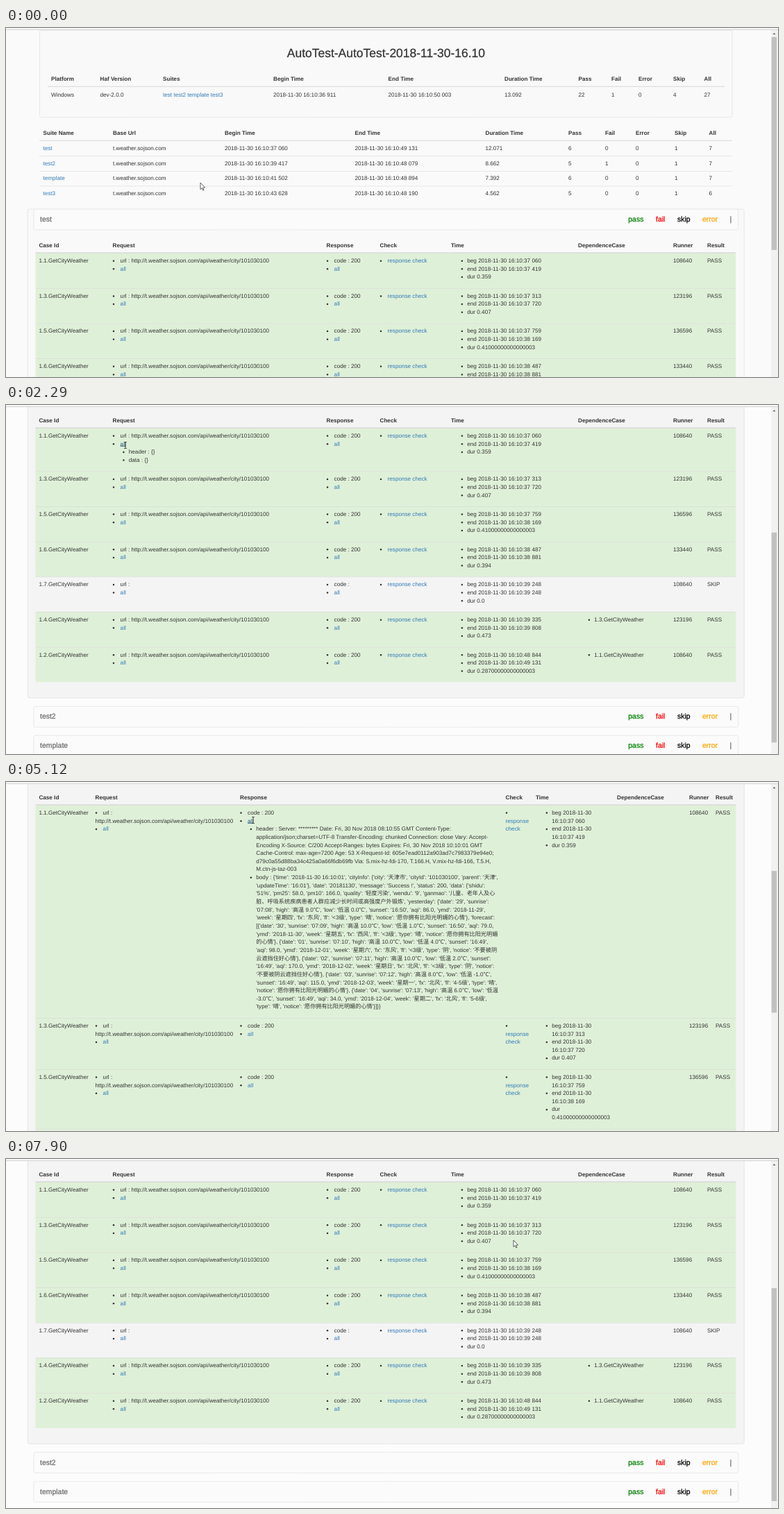
Animation of 1112x503 px, one loop 8 s. Source, as an HTML page with a canvas:

```html
<!DOCTYPE html>
<html lang="en">
<head>
<meta charset="utf-8">
<title>Test report</title>
<style>
html, body { margin: 0; width: 100%; height: 100%; overflow: hidden; background: #fafafa; }
canvas { display: block; }
</style>
</head>
<body>
<canvas id="stage" width="1112" height="503"></canvas>
<script>
const ctx = document.getElementById('stage').getContext('2d');
const LOOP = 8000, SCALE = 0.5825, LINE = 20 * SCALE, SCROLL = 291.1, VIEW = 516;
const INK = '#333', LINK = '#337ab7', HOVER = '#23527c', RULE = '#ddd';
const FAMILY = '"Liberation Sans", Arial, "Noto Sans CJK SC", "Noto Sans CJK", sans-serif';
const font = (px, weight = '') => `${weight} ${px * SCALE}px ${FAMILY}`;
const BODY = font(14), BOLD = font(14, 'bold'), NAV = font(18), TITLE = font(30);
const DAY = '2018-11-30', URL_TEXT = 'http://t.weather.sojson.com/api/weather/city/101030100';

const COLUMNS = {
  plain: [47.4, 153.5, 461.5, 538.5, 641, 824, 961, 1010],
  response: [47.4, 128.5, 337, 719.5, 763, 880, 984, 1022],
  check: [47.4, 151, 453, 528, 650, 829, 963, 1011.5]
};
const CASE_HEADS = ['Case Id', 'Request', 'Response', 'Check', 'Time', 'DependenceCase', 'Runner', 'Result'];
// id, begin, end, duration, runner, dependence
const CASES = [
  ['1.1', '10:37 060', '10:37 419', '0.359', '108640'],
  ['1.3', '10:37 313', '10:37 720', '0.407', '123196'],
  ['1.5', '10:37 759', '10:38 169', '0.41000000000000003', '136596'],
  ['1.6', '10:38 487', '10:38 881', '0.394', '133440'],
  ['1.7', '10:39 248', '10:39 248', '0.0', '108640'],
  ['1.4', '10:39 335', '10:39 808', '0.473', '123196', '1.3'],
  ['1.2', '10:48 844', '10:49 131', '0.28700000000000003', '108640', '1.1']
];
const RUN_X = [65, 135.5, 226, 385, 550.5, 718, 824.5, 872, 911, 961, 1005.5];
const SUITE_X = [53.5, 154, 315, 502.5, 690.5, 810, 863, 907, 963, 1012.5];
const COUNTS = ['Begin Time', 'End Time', 'Duration Time', 'Pass', 'Fail', 'Error', 'Skip', 'All'];
const SUITES = [
  ['test', '37 060', '49 131', '12.071', 6, 0, 7],
  ['test2', '39 417', '48 079', '8.662', 5, 1, 7],
  ['template', '41 502', '48 894', '7.392', 6, 0, 7],
  ['test3', '43 628', '48 190', '4.562', 5, 0, 6]
];

const HEADER = `header : Server: ********* Date: Fri, 30 Nov 2018 08:10:55 GMT Content-Type:
application/json;charset=UTF-8 Transfer-Encoding: chunked Connection: close Vary: Accept-
Encoding X-Source: C/200 Accept-Ranges: bytes Expires: Fri, 30 Nov 2018 10:10:01 GMT
Cache-Control: max-age=7200 Age: 53 X-Request-Id: 605e7ead0112a903ad7c7983379e94e0;
d79c0a55d88ba34c425a0a66f6db69fb Via: S.mix-hz-fdi-170, T.166.H, V.mix-hz-fdi-166, T.5.H,
M.ctn-js-taz-003`.split('\n');
const PAYLOAD = `body : {'time': '2018-11-30 16:10:01', 'cityInfo': {'city': '天津市', 'cityId': '101030100', 'parent': '天津',
'updateTime': '16:01'}, 'date': '20181130', 'message': 'Success !', 'status': 200, 'data': {'shidu':
'51%', 'pm25': 58.0, 'pm10': 166.0, 'quality': '轻度污染', 'wendu': '9', 'ganmao': '儿童、老年人及心
脏、呼吸系统疾病患者人群应减少长时间或高强度户外锻炼', 'yesterday': {'date': '29', 'sunrise':
'07:08', 'high': '高温 9.0℃', 'low': '低温 0.0℃', 'sunset': '16:50', 'aqi': 86.0, 'ymd': '2018-11-29',
'week': '星期四', 'fx': '东风', 'fl': '<3级', 'type': '晴', 'notice': '愿你拥有比阳光明媚的心情'}, 'forecast':
[{'date': '30', 'sunrise': '07:09', 'high': '高温 10.0℃', 'low': '低温 1.0℃', 'sunset': '16:50', 'aqi': 79.0,
'ymd': '2018-11-30', 'week': '星期五', 'fx': '西风', 'fl': '<3级', 'type': '晴', 'notice': '愿你拥有比阳光明媚
的心情'}, {'date': '01', 'sunrise': '07:10', 'high': '高温 10.0℃', 'low': '低温 4.0℃', 'sunset': '16:49',
'aqi': 98.0, 'ymd': '2018-12-01', 'week': '星期六', 'fx': '东风', 'fl': '<3级', 'type': '阴', 'notice': '不要被阴
云遮挡住好心情'}, {'date': '02', 'sunrise': '07:11', 'high': '高温 10.0℃', 'low': '低温 2.0℃', 'sunset':
'16:49', 'aqi': 170.0, 'ymd': '2018-12-02', 'week': '星期日', 'fx': '北风', 'fl': '<3级', 'type': '阴', 'notice':
'不要被阴云遮挡住好心情'}, {'date': '03', 'sunrise': '07:12', 'high': '高温 8.0℃', 'low': '低温 -1.0℃',
'sunset': '16:49', 'aqi': 115.0, 'ymd': '2018-12-03', 'week': '星期一', 'fx': '北风', 'fl': '4-5级', 'type': '晴',
'notice': '愿你拥有比阳光明媚的心情'}, {'date': '04', 'sunrise': '07:13', 'high': '高温 6.0℃', 'low': '低温
-3.0℃', 'sunset': '16:49', 'aqi': 34.0, 'ymd': '2018-12-04', 'week': '星期二', 'fx': '北风', 'fl': '5-6级',
'type': '晴', 'notice': '愿你拥有比阳光明媚的心情'}]}}`.split('\n');

// Timeline: each entry holds from its start time on
const OPEN = [[0, ''], [2290, 'request'], [2940, ''], [4040, 'response'], [5400, ''], [6490, 'check'], [7200, '']];
const HOVERED = [[0, ''], [1870, 'request'], [3080, ''], [3790, 'response'], [4040, ''],
  [5120, 'response'], [5535, ''], [6210, 'check'], [7480, '']];
// Pointer moves: first step, last step, step count, x, y
const MOVES = [
  [120, 530, 4, 285, 235], [950, 1590, 6, 168, 53], [1870, 1870, 1, 165, 57], [2010, 2010, 1, 172, 58],
  [3080, 3790, 6, 475, 59], [4180, 5000, 7, 357, 55], [5120, 5120, 1, 356, 55],
  [5535, 6210, 6, 570, 45], [7480, 7900, 4, 731, 117]
];

const at = (list, t) => list.filter(e => e[0] <= t).pop()[1];
const ease = p => p * p * (3 - 2 * p);

function progress(t, [from, to, steps]) {
  if (t < from) return 0;
  const gap = (to - from) / (steps - 1) || 1;
  return Math.min(steps, 1 + Math.floor((t - from) / gap + 0.001)) / steps;
}

function pointer(t) {
  let x = 280, y = 223;
  for (const move of MOVES) {
    const p = ease(progress(t, move));
    x += (move[3] - x) * p;
    y += (move[4] - y) * p;
  }
  return [x, y];
}

function rect(x, y, w, h, color) {
  ctx.fillStyle = color;
  ctx.fillRect(x, y, w, h);
}

function box(x, y, w, h, fill, stroke) {
  ctx.beginPath();
  ctx.roundRect(x, y, w, h, 2.3);
  ctx.fillStyle = fill;
  ctx.fill();
  ctx.strokeStyle = stroke;
  ctx.lineWidth = 0.8;
  ctx.stroke();
}

function text(str, x, y, color = INK, face = BODY) {
  ctx.font = face;
  ctx.fillStyle = color;
  ctx.fillText(str, x, y);
}

// Large type has slightly heavier stems
function largeText(str, x, y, color, face) {
  text(str, x, y, color, face);
  ctx.strokeStyle = color;
  ctx.lineWidth = 0.25;
  ctx.strokeText(str, x, y);
}

function link(str, x, y, hot) {
  text(str, x, y, hot ? HOVER : LINK);
  if (hot) rect(x, y + 0.7, ctx.measureText(str).width, 0.7, HOVER);
}

function dot(x, y) {
  ctx.beginPath();
  ctx.arc(x, y - 2.3, 1.25, 0, 7);
  ctx.fillStyle = INK;
  ctx.fill();
}

function nested(lines, col, y, color) {
  dot(col + 15.9, y);
  lines.forEach((s, i) => text(s, col + 23.3, y + i * LINE, color));
}

function cells(values, xs, y, face, links = -1) {
  values.forEach((v, i) => text(v, xs[i], y, i === links ? LINK : INK, face));
}

function summary() {
  box(48.4, 3.4, 997.6, 125.4, '#f9f9f9', '#e3e3e3');
  ctx.textAlign = 'center';
  largeText('AutoTest-AutoTest-2018-11-30-16.10', 547.4, 41.8, INK, TITLE);
  ctx.textAlign = 'left';
  cells(['Platform', 'Haf Version', 'Suites', ...COUNTS], RUN_X, 76, BOLD);
  rect(60, 83.8, 975, 1.17, RULE);
  cells(['Windows', 'dev-2.0.0', 'test test2 template test3', DAY + ' 16:10:36 911', DAY + ' 16:10:50 003',
    '13.092', 22, 1, 0, 4, 27], RUN_X, 98.6, BODY, 2);

  cells(['Suite Name', 'Base Url', ...COUNTS], SUITE_X, 154.4, BOLD);
  rect(48, 161.7, 998, 1.17, RULE);
  SUITES.forEach(([name, begin, end, time, pass, fail, all], i) => {
    const y = 176.3 + i * 37 * SCALE;
    if (i) rect(48, y - 13.4, 998, 0.7, RULE);
    cells([name, 't.weather.sojson.com', `${DAY} 16:10:${begin}`, `${DAY} 16:10:${end}`,
      time, pass, fail, 0, 1, all], SUITE_X, y, BODY, 0);
  });
}

function navbar(name, y) {
  box(39.8, y, 1015, 29.8, '#fbfbfb', '#e5e5e5');
  const label = (str, x, color) => largeText(str, x, y + 18, color, NAV);
  label(name, 49, '#6c6c6c');
  label('pass', 896.3, 'green');
  label('fail', 936, 'red');
  label('skip', 967, 'black');
  label('error', 1003, 'orange');
  label('|', 1042.6, '#667');
}

function timeLines([, begin, end, dur], narrow) {
  const stamp = (word, v) => narrow ? [`${word} ${DAY}`, `16:${v}`] : [`${word} ${DAY} 16:${v}`];
  return [stamp('beg', begin), stamp('end', end),
    narrow && dur.length > 9 ? ['dur', dur] : ['dur ' + dur]];
}

function layoutCases(open) {
  const narrow = open === 'response';
  let y = 324.2;
  const rows = CASES.map((data, i) => {
    const times = timeLines(data, narrow);
    let lines = times.flat().length;
    if (!i && open === 'request') lines = 4;
    if (!i && narrow) lines = 2 + HEADER.length + PAYLOAD.length;
    const row = { data, times, y, h: lines * LINE + 27 * SCALE };
    y += row.h;
    return row;
  });
  return { rows, end: y };
}

function drawCase({ data, times, y, h }, first, open, hover) {
  const [id, , , , runner, needs] = data;
  const [cId, cReq, cRes, cCheck, cTime, cDep, cRun, cResult] = COLUMNS[open] || COLUMNS.plain;
  const narrow = open === 'response', skipped = id === '1.7';
  const line = n => y + 13.8 + n * LINE;
  const hot = name => first && hover === name;
  const IN = 11.1;

  if (!skipped) rect(42.6, y, 1008.6, h, '#dff0d8');
  rect(42.6, y, 1008.6, 0.7, '#d8dcd6');
  text(id + '.GetCityWeather', cId, line(0));

  const allLine = narrow && !skipped ? 2 : 1;
  dot(cReq + 1.5, line(0));
  text(narrow || skipped ? 'url :' : 'url : ' + URL_TEXT, cReq + IN, line(0));
  if (allLine === 2) text(URL_TEXT, cReq, line(1));
  dot(cReq + 1.5, line(allLine));
  link('all', cReq + IN, line(allLine), hot('request'));
  if (first && open === 'request') {
    nested(['header : {}'], cReq, line(2));
    nested(['data : {}'], cReq, line(3));
  }

  dot(cRes + 1.5, line(0));
  text(skipped ? 'code :' : 'code : 200', cRes + IN, line(0));
  dot(cRes + 1.5, line(1));
  link('all', cRes + IN, line(1), hot('response'));
  if (first && narrow) {
    nested(HEADER, cRes, line(2));
    nested(PAYLOAD, cRes, line(2 + HEADER.length));
  }

  dot(cCheck + 1.5, line(0));
  if (narrow) {
    link('response', cCheck, line(1));
    link('check', cCheck, line(2));
  } else {
    link('response check', cCheck + IN, line(0), hot('check'));
  }
  if (first && open === 'check') {
    nested(['code check: True'], cCheck, line(1));
    nested(['body check: True'], cCheck, line(2), LINK);
  }

  let n = 0;
  for (const part of times) {
    nested(part, cTime, line(n));
    n += part.length;
  }
  if (needs) nested([needs + '.GetCityWeather'], cDep, line(0));
  text(runner, cRun, line(0));
  text(skipped ? 'SKIP' : 'PASS', cResult, line(0));
}

function drawCases({ rows, end }, open, hover, fill) {
  const bottom = end + 39 * SCALE;
  box(31.2, 261, 1032, bottom - 261, fill, '#e3e3e3');
  navbar('test', 261);
  cells(CASE_HEADS, COLUMNS[open] || COLUMNS.plain, 315.6, BOLD);
  rows.forEach((row, i) => drawCase(row, i === 0, open, hover));
  rect(42.6, 323.2, 1008.6, 1.17, RULE);
  ['test2', 'template', 'test3'].forEach((name, i) => navbar(name, bottom + 12.2 + i * 72 * SCALE));
}

function scrollbar(scroll, end) {
  const height = 834 + end - 679, track = 496;
  rect(1102, 3, 10, 500, '#f1f1f1');
  rect(1102.7, 13 + scroll / height * track, 7.4, VIEW / height * track, '#c1c1c1');
  ctx.beginPath();
  ctx.moveTo(1104.4, 9.3);
  ctx.lineTo(1106.5, 7);
  ctx.lineTo(1108.6, 9.3);
  ctx.fillStyle = '#606060';
  ctx.fill();
}

function arrow(x, y) {
  ctx.beginPath();
  [[0, 0], [0, 9.6], [2.2, 7.6], [3.7, 11], [5.1, 10.4], [3.7, 7.1], [6.6, 7]]
    .forEach(([dx, dy]) => ctx.lineTo(x + dx, y + dy));
  ctx.closePath();
  ctx.fillStyle = '#fff';
  ctx.fill();
  ctx.strokeStyle = '#222';
  ctx.lineWidth = 0.7;
  ctx.stroke();
}

function beam(x, y) {
  rect(x - 0.4, y - 4.5, 0.8, 9, '#222');
  for (const dy of [-4.7, 4]) rect(x - 2, y + dy, 4, 0.7, '#222');
}

function draw(t) {
  const open = at(OPEN, t), hover = at(HOVERED, t);
  const scroll = SCROLL * progress(t, MOVES[0]);
  const layout = layoutCases(open);
  const [page, well] = scroll ? ['#fcfcfc', '#f4f4f4'] : ['#fafafa', '#f9f9f9'];
  rect(0, 0, 1112, 503, page);
  ctx.save();
  ctx.translate(0, -scroll);
  summary();
  drawCases(layout, open, hover, well);
  ctx.restore();
  scrollbar(scroll, layout.end);
  rect(0, 0, 1112, 2, '#f7f7f7');
  rect(0, 2, 1112, 1, '#d4d4d4');
  (hover ? beam : arrow)(...pointer(t));
}

ctx.textRendering = 'geometricPrecision';
const start = performance.now();
function tick() {
  draw((performance.now() - start) % LOOP);
  requestAnimationFrame(tick);
}
tick();
</script>
</body>
</html>
```
